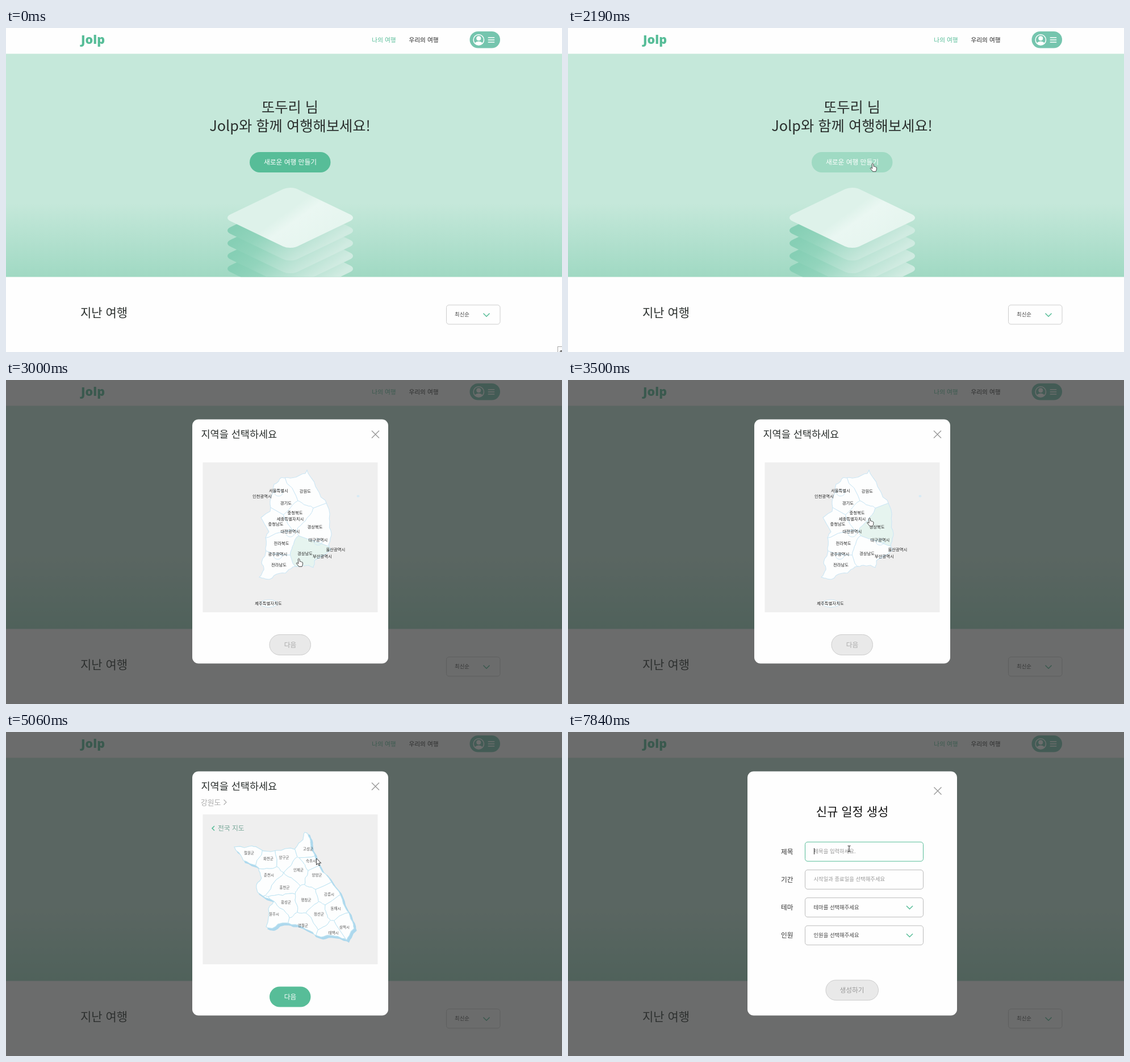
These frames come from a looping animation (979 px wide and 572 px high, 8000 ms). An HTML page:

```html
<!DOCTYPE html>
<html lang="ko">
<head>
<meta charset="utf-8">
<style>
html, body { margin: 0; width: 100%; height: 100%; overflow: hidden; background: #fefefe; }
svg { display: block; width: 979px; height: 572px; font-family: "Noto Sans CJK KR", "Noto Sans CJK", "Noto Sans", sans-serif; }
</style>
</head>
<body>
<svg id="stage" viewBox="0 0 979 572"></svg>
<script>
const GREEN = '#57bd98', PALE = '#9fdac3', INK = '#2a2f2d', LAND = '#fdfefe';
const stage = document.getElementById('stage');

// Text is placed by its vertical centre.
const text = (s, x, cy, size, fill = INK, anchor = 'middle', extra = '') =>
  `<text x="${x}" y="${cy + size * .37}" font-size="${size}" fill="${fill}" text-anchor="${anchor}" ${extra}>${s}</text>`;
const bold = 'font-weight="500"';
const box = (x, y, w, h, r, fill, extra = '') =>
  `<rect x="${x}" y="${y}" width="${w}" height="${h}" rx="${r}" fill="${fill}" ${extra}/>`;
const line = (d, stroke, width, extra = '') =>
  `<path d="${d}" fill="none" stroke="${stroke}" stroke-width="${width}" ${extra}/>`;
const chevron = (x, y) => line(`M${x - 5.5} ${y - 2.7}l5.5 5.5l5.5 -5.5`, GREEN, 1.5);
const cross = (x, y, extra) => line(`M${x - 6.5} ${y - 6.5}l13 13m0 -13l-13 13`, '#999', 1.4, extra);

function home() {
  const sheet = (y, fill) =>
    `<g transform="translate(500.5 ${y}) scale(1 .48) rotate(45)">${box(-83.4, -83.4, 166.8, 166.8, 18, fill)}</g>`;
  return `<defs>
    <linearGradient id="sky" x2="0" y2="1"><stop offset=".67" stop-color="#c5e8da"/><stop offset="1" stop-color="#a0d9c3"/></linearGradient>
    <linearGradient id="top" x1="0" y1=".6" x2="1" y2=".4"><stop offset=".4" stop-color="#def2ea"/><stop offset=".58" stop-color="#eaf7f2"/><stop offset="1" stop-color="#e6f5ef"/></linearGradient>
    <linearGradient id="low" x1="0" y1=".6" x2="1" y2=".4"><stop stop-color="#86cfb5"/><stop offset=".3" stop-color="#92d4bc"/><stop offset="1" stop-color="#d0ebe1"/></linearGradient>
    <clipPath id="hero">${box(0, 45, 979, 394.5, 0, '#000')}</clipPath></defs>
    ${box(0, 0, 979, 572, 0, '#fefefe')}${box(0, 45.5, 979, 394, 0, 'url(#sky)')}
    <g clip-path="url(#hero)">${[3, 2, 1, 0].map(i => sheet(357.5 + i * 22.5, 'url(#low)')).join('')}${sheet(335, 'url(#top)')}</g>
    <text x="132" y="28" font-size="21.5" font-weight="800" fill="${GREEN}" font-family="'Open Sans', sans-serif">Jolp</text>
    ${text('나의 여행', 665.5, 21, 10.7, GREEN, 'middle', bold)}${text('우리의 여행', 735.5, 21, 10.7, '#222', 'middle', bold)}
    ${box(816.5, 6, 53.5, 29.5, 14.75, '#75c5ae')}
    <circle cx="832.3" cy="21" r="9.2" fill="none" stroke="#fff" stroke-width="1.5"/>
    <circle cx="832.3" cy="18.3" r="4" fill="#fff"/><path d="M825.3 26.5q7 -6 14 0q-7 6.5 -14 0" fill="#fff"/>
    ${line('M848.7 17h11.5m0 4h-11.5m0 4h11.5', '#fff', 1.7)}
    ${text('또두리 님', 500, 140, 25.3, INK, 'middle', bold)}${text('Jolp와 함께 여행해보세요!', 500, 172.5, 25.3, INK, 'middle', bold)}
    ${box(429, 219, 142.5, 36, 18, GREEN, 'id="create"')}${text('새로운 여행 만들기', 500.5, 237, 11.75, '#fff', 'middle', bold)}
    ${text('지난 여행', 131, 502, 21, INK, 'start', bold)}
    ${box(775.5, 489, 94.5, 34, 4.5, '#fefefe', 'stroke="#ccc"')}${text('최신순', 790, 506, 9.4, '#444', 'start')}${chevron(846, 506.5)}
    <g id="tip">${box(971.5, 562.5, 20, 20, 0, '#fafafa', 'stroke="#aaa"')}<path d="M974.5 571.5l3 -3l3 3z" fill="#555"/></g>`;
}

// Subdivides an edge with a jitter that is the same from both sides.
function split([ax, ay], [bx, by], depth) {
  if (!depth) return [[bx, by]];
  const x = (ax + bx) / 2, y = (ay + by) / 2, k = Math.min(2.5, Math.hypot(bx - ax, by - ay) * .1);
  const mid = [x + k * Math.sin(x * 2.9 + y * 8.2), y + k * Math.sin(x * 9.3 + y * 1.1)];
  return [...split([ax, ay], mid, depth - 1), ...split(mid, [bx, by], depth - 1)];
}
const rough = (points, depth) =>
  'M' + points.flatMap((p, i) => split(p, points[(i + 1) % points.length], depth)).map(p => p.map(v => v.toFixed(1))).join('L') + 'Z';

// The part of the map nearer to one place than to any other.
function cell(own, places) {
  let poly = [[330, 130], [670, 130], [670, 420], [330, 420]];
  for (const other of places) {
    if (other === own) continue;
    const dx = other.x - own.x, dy = other.y - own.y;
    const side = ([x, y]) => (x - (own.x + other.x) / 2) * dx + (y - (own.y + other.y) / 2) * dy;
    poly = poly.flatMap((p, i) => {
      const q = poly[(i + 1) % poly.length], a = side(p), b = side(q), u = a / (a - b);
      const kept = a <= 0 ? [p] : [];
      return a * b < 0 ? [...kept, p.map((v, n) => v + (q[n] - v) * u)] : kept;
    });
  }
  return poly;
}

const parsePlaces = list => list.split(', ').map(s => {
  const [name, x, y] = s.split(' ');
  return { name, x: +x, y: +y };
});

function map(id, coast, places, areas, size, ink, stroke, shadow = '', extra = '') {
  const d = rough(coast.split(' ').map(s => s.split(',').map(Number)), 2);
  return `<clipPath id="${id}Clip"><path d="${d}"/></clipPath>${shadow && `<path d="${d}" ${shadow}/>`}
    <path id="${id}Coast" d="${d}" fill="${LAND}"/><g clip-path="url(#${id}Clip)" fill="${LAND}" stroke="${stroke}">
    ${areas.map(a => `<path data-area="${a.name}" d="${rough(cell(a, areas), 3)}"/>`).join('')}${extra}</g>${line(d, stroke, 1.1)}` +
    places.map(p => text(p.name, p.x, p.y, size, ink, 'middle', `${bold} data-label="${p.name}"`)).join('');
}

const countryPlaces = parsePlaces('서울특별시 480 195.5, 강원도 527 196.5, 인천광역시 451 205, 경기도 493 217.5, 충청북도 509 234, 세종특별자치시 500.5 245.5, 충청남도 475 254, 대전광역시 500.5 267.5, 경상북도 544 259, 대구광역시 549.5 282, 전라북도 485 288, 울산광역시 580.5 299.5, 광주광역시 478.5 307, 경상남도 526.5 306, 부산광역시 557 311, 전라남도 480.5 326, 제주특별자치도 462 394.5');
const provinces = countryPlaces.filter(p => /^..?.도$/.test(p.name));
const regionPlaces = parsePlaces('철원군 428 213.5, 화천군 462 224, 양구군 489.5 222, 고성군 532 207, 속초시 537 228, 춘천시 463 252.5, 인제군 515 244, 양양군 547.5 252.5, 홍천군 490.5 274.5, 강릉시 569 287, 횡성군 493 301, 평창군 528.5 297, 동해시 580.5 311.5, 원주시 472 322, 정선군 551 321.5, 영월군 523 342, 삼척시 596 345, 태백시 576.5 355');

function countryMap() {
  const towns = countryPlaces.filter(p => /(광역|특별)시$/.test(p.name))
    .map(p => `<ellipse cx="${p.x}" cy="${p.y + 4}" rx="7" ry="5.5" fill="none"/>`).join('');
  const coast = '485,172 508,172 527,165 530,159 545,188 566,222 570,250 573,271 568,291 572,300 556,312 543,319 541,331 520,327 505,330 492,341 474,344 463,352 446,348 454,335 450,322 457,297 457,278 463,268 449,243 465,232 466,208 472,184';
  return `<ellipse cx="620" cy="205" rx="2.5" ry="2" fill="#d6eaf5"/><ellipse cx="463" cy="394.5" rx="15" ry="6.5" fill="${LAND}" stroke="#cce6f4"/>` +
    map('country', coast, countryPlaces, provinces, 7.35, '#222', '#cce6f4', '', towns);
}

function regionMap() {
  const coast = '402,203 433,201 448,207 476,209 508,207 523,190 526,177 531,179 536,195 549,232 562,250 592,295 607,330 613,347 600,367 578,360 555,362 535,351 503,340 492,337 470,346 458,344 462,312 472,299 443,283 441,270 450,258 445,240 418,227 410,213';
  return map('region', coast, regionPlaces, regionPlaces, 6.5, '#555', '#bfe4f2', 'fill="#add8ed" stroke="#add8ed" stroke-width="2" transform="translate(3.5 3.5)"') +
    line('M367 166l-4 4l4 4', GREEN, 1.6) + text('전국 지도', 373, 170, 11.8, '#74a596', 'start') +
    text('강원도', 343, 124, 12.8, '#aaa', 'start') + line('M383.5 119.5l4.5 4.5l-4.5 4.5', '#aaa', 1.1) +
    `<g id="chosen">${text('강릉시', 394.5, 124, 12.8, '#555', 'start')}</g>`;
}

function form() {
  const rows = ['제목:제목을 입력하세요.', '기간:시작일과 종료일을 선택해주세요', '테마:테마를 선택해주세요', '인원:인원을 선택해주세요'];
  return box(316, 69.5, 369, 431, 11, '#fefefe') + cross(651, 104) + text('신규 일정 생성', 500.5, 140.5, 21, '#111', 'middle', bold) +
    rows.map((row, i) => {
      const [name, hint] = row.split(':'), cy = 211.2 + i * 49.25;
      return text(name, 375, cy, 11.7, '#333', 'start') + box(417.5, cy - 17, 208, 34, 4.5, '#fefefe', 'stroke="#bbb" class="field"') +
        text(hint, 432.5, cy - .5, 9.35, i < 2 ? '#999' : '#444', 'start') + (i > 1 ? chevron(601.5, cy) : '');
    }).join('') + line('M433.5 205v11', '#222', 1, 'id="caret"') +
    box(454, 438, 92.5, 35.5, 17.75, '#e9e9e9', 'stroke="#ccc"') + text('생성하기', 500, 455.5, 11.7, '#999');
}

const cursors = `
  <path id="arrow" d="M0 0v11.5l2.7 -2.5l1.8 4l1.8 -.8l-1.8 -3.9h3.7z" fill="#fff" stroke="#222" stroke-width=".9"/>
  <path id="hand" d="M-1.3 1q1.3 -2 2.5 0l.5 4.5q1.4 -.8 2 .4q1.4 -.5 1.800 .7q1.6 -.1 1.5 1.8q0 3.6 -1.5 6h-5.5q-1.2 -2.4 -4 -5q-.8 -1.6 .8 -1.8l2.3 1.6z" fill="#fff" stroke="#333" stroke-width=".9"/>
  <path id="beam" d="M-2.5 -5h2l.5 .5l.5 -.5h2m-2.5 0v10m-2.5 0h5" fill="none" stroke="#222"/>`;

stage.innerHTML = home() + `<g id="overlay">${box(0, 0, 979, 572, 0, '#2e3030', 'opacity=".7"')}</g>
  <g id="picker">${box(328, 69.5, 345, 431, 11, '#fefefe')}${text('지역을 선택하세요', 343.5, 96, 17.5, INK, 'start', bold)}
    ${cross(650.5, 96, 'id="close"')}${box(346.5, 145.5, 308, 264.5, 0, '#efefef')}
    <g id="country">${countryMap()}</g><g id="region">${regionMap()}</g>
    ${box(464, 449.5, 72.5, 36, 18, '#e9e9e9', 'id="next"')}${text('다음', 500.5, 467.5, 11.7, '#aaa', 'middle', 'id="nextText"')}</g>
  <g id="form">${form()}</g><g id="cursor">${cursors}</g>`;

const $ = id => document.getElementById(id);
const show = (id, on) => $(id).style.display = on ? '' : 'none';

// Each move: start, end, x, y. The cursor rests in between.
const moves = [[1480, 2190, 536.5, 239], [2720, 2900, 541, 305], [2900, 3080, 498, 322], [3080, 3500, 531, 243.5], [3560, 3710, 530, 208],
  [3960, 4720, 537, 207], [4920, 5060, 546.5, 223], [5060, 5620, 551, 288.5], [6670, 7440, 503, 462], [7510, 7840, 495, 206]];

function pointer(t) {
  let x = 908, y = 300;
  for (const [from, to, toX, toY] of moves) {
    const u = Math.min(1, Math.max(0, (t - from) / (to - from))), e = u * u * (3 - 2 * u);
    x += (toX - x) * e;
    y += (toY - y) * e;
  }
  return { x, y };
}

function onLand(id, { x, y }) {
  const p = stage.createSVGPoint();
  p.x = x;
  p.y = y;
  return $(id + 'Coast').isPointInFill(p);
}
const nearest = (places, { x, y }) => places.reduce((a, b) =>
  Math.hypot(a.x - x, a.y - y) < Math.hypot(b.x - x, b.y - y) ? a : b).name;

function draw(t) {
  const at = pointer(t);
  const picking = t >= 2320, inRegion = t >= 3960, ready = t >= 7510, focused = t >= 7830;
  const onCreate = !picking && t >= 1480 && at.x < 571, onNext = inRegion && !ready && at.y > 449.5;
  show('tip', t < 715);
  show('overlay', picking);
  show('picker', picking && !ready);
  show('close', t >= 2400);
  show('country', !inRegion);
  show('region', inRegion);
  show('chosen', t >= 6040);
  show('form', ready);
  show('cursor', t >= 1480);
  show('caret', focused);
  $('create').setAttribute('fill', onCreate ? PALE : GREEN);
  $('next').setAttribute('fill', !inRegion ? '#e9e9e9' : onNext ? PALE : GREEN);
  $('next').setAttribute('stroke', inRegion ? 'none' : '#ccc');
  $('nextText').setAttribute('fill', inRegion ? '#fff' : '#aaa');
  stage.querySelector('.field').setAttribute('stroke', focused ? GREEN : '#bbb');

  const land = picking && !ready && onLand(inRegion ? 'region' : 'country', at);
  const hovered = land ? nearest(inRegion ? regionPlaces : provinces, at) : '';
  for (const area of $('country').querySelectorAll('[data-area]'))
    area.setAttribute('fill', area.dataset.area === hovered ? '#e6f4ef' : LAND);
  for (const label of $('region').querySelectorAll('[data-label]')) {
    const on = label.dataset.label === hovered;
    label.setAttribute('font-weight', on ? 700 : 500);
    label.setAttribute('fill', on ? '#222' : '#555');
  }

  const inField = ready && [211, 260].some(cy => Math.abs(at.y - cy) < 17);
  const kind = inField ? 'beam' : land || onCreate || onNext ? 'hand' : 'arrow';
  $('cursor').setAttribute('transform', `translate(${at.x} ${at.y})`);
  for (const id of ['arrow', 'hand', 'beam']) show(id, id === kind);
}

const start = performance.now();
(function tick() {
  draw((performance.now() - start) % 8000);
  requestAnimationFrame(tick);
})();
</script>
</body>
</html>
```
